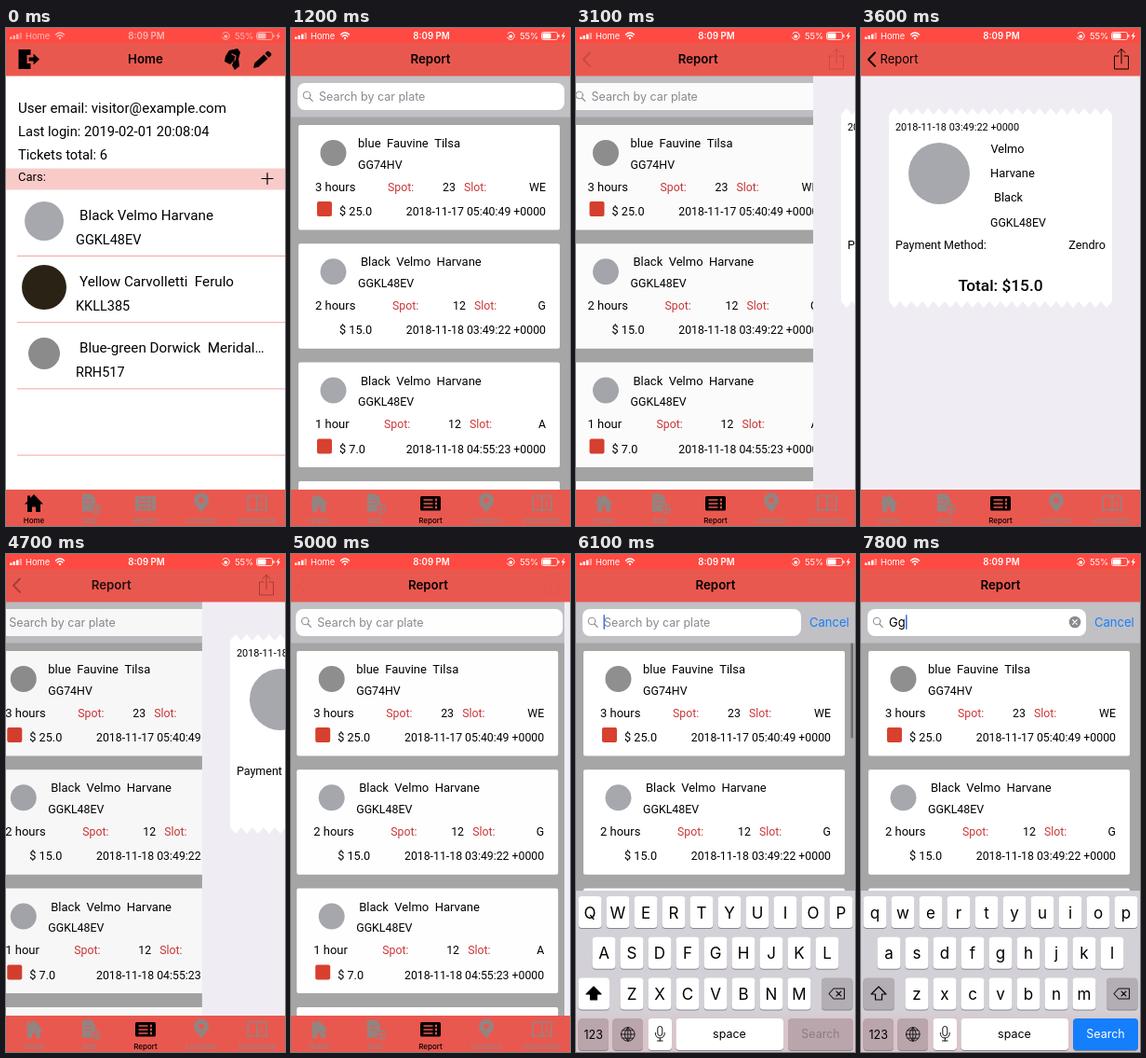
Recreate the animation shown at these times as an HTML page. Size 300x534 px, loop 8 s.

```html
<!DOCTYPE html>
<html lang="en">
<head>
<meta charset="utf-8">
<title>Parking report</title>
<style>
  html, body { margin: 0; width: 100%; height: 100%; overflow: hidden; background: #fff; }
  svg { display: block; width: 100vw; height: 100vh; }
  text { font-family: Inter, Roboto, sans-serif; }
  .din { font-family: Roboto, "Open Sans", sans-serif; }
  .line { fill: none; stroke-linecap: round; stroke-linejoin: round; }
</style>
</head>
<body>
<svg id="stage" viewBox="0 0 300 534"></svg>
<script>
const LOOP = 8000, STEP = 100;
const RED = '#e9584f', SPOT = '#cc3437', BLUE = '#157efb', MUTED = '#938481';

// Keyframe tables: [time, value]
const DETAIL = [[3000, 0], [3100, .15], [3200, .55], [3300, .82], [3400, .95], [3500, .99], [3600, 1],
  [4400, 1], [4500, .93], [4600, .62], [4700, .297], [4800, .13], [4900, .05], [5000, .02], [5200, 0]];
const KEYBOARD = [[5500, 0], [5600, .08], [5700, .32], [5800, .75], [5900, .93], [6000, .985], [6100, 1]];
const CANCEL = [[5600, 0], [5700, .04], [5800, .42], [5900, .82], [6000, .96], [6100, 1]];
const STATUS = [[0, .6], [200, 1]];
const REPORT_AT = 1200, FOCUS_AT = 5400;
const TYPED = [[6300, 'G'], [7000, 'Gg']];

// Drawing helpers
const text = (x, y, size, str, attrs = '') =>
  `<text x="${x}" y="${y}" font-size="${size}" ${attrs}>${str.replace(/ {2}/g, ' \u00a0')}</text>`;
const din = (x, y, size, str, attrs = '') => text(x, y, size, str, 'class="din" ' + attrs);
const rect = (x, y, w, h, fill, r = 0, attrs = '') =>
  `<rect x="${x}" y="${y}" width="${w}" height="${h}" rx="${r}" fill="${fill}" ${attrs}/>`;
const dot = (x, y, r, fill) => `<circle cx="${x}" cy="${y}" r="${r}" fill="${fill}"/>`;
const line = (d, color = '#000', w = 1, attrs = '') =>
  `<path class="line" d="${d}" stroke="${color}" stroke-width="${w}" ${attrs}/>`;
const shape = (d, fill = '#000') => `<path d="${d}" fill="${fill}"/>`;
const group = (id, body, attrs = '') => `<g id="${id}" ${attrs}>${body}</g>`;
const MID = 'text-anchor="middle"', END = 'text-anchor="end"';

function homePage() {
  const cars = [
    ['Black Velmo Harvane', 'GGKL48EV', '#a7a8ae', 21],
    ['Yellow Carvolletti  Ferulo', 'KKLL385', '#2a2315', 24],
    ['Blue-green Dorwick  Meridal…', 'RRH517', '#8b8b8b', 17],
  ];
  const rows = cars.map(([name, plate, color, r], i) => {
    const y = 71 * i;
    return dot(41, 207 + y, r, color) + din(79, 206 + y, 15.2, name) + din(75, 231.5 + y, 14.5, plate);
  });
  const rules = [0, 1, 2, 3].map(i => rect(12, 244 + 71.2 * i, 288, 1, '#f3a5a2'));
  return rect(0, 0, 300, 534, '#fff')
    + din(13, 91, 15.1, 'User email: visitor@example.com')
    + din(13, 115.5, 14.7, 'Last login: 2019-02-01 20:08:04')
    + din(13, 140.5, 14.7, 'Tickets total: 6')
    + rect(0, 150.5, 300, 23, '#f8cbc9') + din(13, 164, 13, 'Cars:')
    + line('M275 161.5h12M281 155.5v12', '#000', 1.2)
    + rows.join('') + rules.join('');
}

function card(i, c) {
  const y = 104 + 127.3 * i;
  const label = (x, s) => din(x, y + 70.5, 12.3, s, `fill="${SPOT}"`);
  return rect(8, y, 281, 112.5, '#fff', 2)
    + dot(45.5, y + 30, 14, c.color)
    + din(c.nameX, y + 24, 13, c.name) + din(72, y + 46.5, 12.4, c.plate)
    + din(26, y + 70.5, 13, c.time)
    + label(c.x[0], 'Spot:') + din(c.x[1], y + 70.5, 12.3, c.spot)
    + label(c.x[2], 'Slot:') + din(274, y + 70.5, 12.3, c.slot, END)
    + (c.paid ? rect(28, y + 82, 16, 16, '#d8402f', 2) : '')
    + din(52, y + 97, 12.7, c.price) + din(274, y + 97, 12.3, c.date, END);
}

function listPage() {
  const velmo = { color: '#a7a8ae', nameX: 75, name: 'Black  Velmo  Harvane', plate: 'GGKL48EV', spot: '12' };
  const cards = [
    { color: '#8f8f8f', nameX: 72, name: 'blue  Fauvine  Tilsa', plate: 'GG74HV', time: '3 hours', x: [104, 163, 186],
      spot: '23', slot: 'WE', paid: true, price: '$ 25.0', date: '2018-11-17 05:40:49 +0000' },
    { ...velmo, time: '2 hours', x: [109, 174, 197], slot: 'G', price: '$ 15.0', date: '2018-11-18 03:49:22 +0000' },
    { ...velmo, time: '1 hour', x: [100, 169, 192], slot: 'A', paid: true, price: '$ 7.0',
      date: '2018-11-18 04:55:23 +0000' },
  ];
  return rect(0, 0, 300, 534, '#a6a6a7')
    + rect(0, 51, 300, 44.5, '#c1c0c5')
    + rect(7, 59, 287, 29, '#fff', 8, 'id="field"')
    + `<circle cx="17" cy="72" r="3.8" class="line" stroke="#8a8a8f"/>` + line('M19.9 75l3.3 3.4', '#8a8a8f', 1.2)
    + text(30, 77.5, 12.5, 'Search by car plate', 'id="hint" fill="#8a8a90"')
    + text(30, 77.5, 13, '', 'id="query"')
    + rect(29.5, 65, 1.6, 16, '#3b78e7', .8, 'id="caret"')
    + group('clear', dot(230, 73, 6.3, '#8a8a8f') + line('M227.7 70.7l4.6 4.6m0-4.6l-4.6 4.6', '#fff', 1.2))
    + text(251, 77.5, 13, 'Cancel', `id="cancel" fill="${BLUE}"`)
    + cards.map((c, i) => card(i, c)).join('') + rect(8, 486, 281, 48, '#fff', 2)
    + rect(295.5, 95.5, 2.5, 102, '#6d6d6e', 1.2, 'id="scroll"')
    + rect(0, 0, 300, 534, '#000', 0, 'id="dim"');
}

function detailPage() {
  const teeth = 20, w = 240 / teeth;
  const top = `l${w / 2} -7l${w / 2} 7`.repeat(teeth), bottom = `l${-w / 2} 7l${-w / 2} -7`.repeat(teeth);
  return rect(0, 0, 300, 534, '#efedf3')
    + shape(`M30 93${top}V293${bottom}Z`, '#fff')
    + din(37, 109.5, 10.9, '2018-11-18 03:49:22 +0000')
    + dot(84, 156, 33, '#a7a8ae')
    + din(139.5, 133.5, 12.7, 'Velmo') + din(139, 160, 12.9, 'Harvane')
    + din(143, 186, 12.7, 'Black') + din(139, 212.5, 12.3, 'GGKL48EV')
    + din(37, 237, 12.5, 'Payment Method:') + din(263, 237, 12.7, 'Zendro', END)
    + din(150, 282, 17.3, 'Total: $15.0', MID + ' font-weight="500"');
}

function navBar() {
  const homeIcons =
    `<g transform="translate(-1.5 0)">${shape('M15 23h13v6h-4v9h4v6H15Z')
      + shape('M26 31.5h5v-4l6.5 6-6.5 6v-4h-5Z')}</g>`
    + shape('M240 24l9-2 3 4-2 7 1 8-5 4-3-5 2-5-4 4-6-3 1-6Z') + line('M243 28l4 2-1 5', RED, 1.2)
    + shape('M266 43l1.3-5.5 10-9 4.3 4.3-10 9ZM278.5 27.3l2.2-2.2q1.2-1 2.500.3l1.700 1.700q1.200 1.200 0 2.500l-2.200 2.200Z');
  return rect(0, 0, 300, 51.5, RED) + rect(0, 0, 300, 16, '#fe4a42')
    + group('homeIcons', homeIcons)
    + text(150, 38, 13.3, 'Home', `id="title" ${MID} font-weight="600"`)
    + text(41, 38, 13, 'Report', `id="back" ${MID}`)
    + group('detailIcons', line('M15 26.5L8 33.7l7 7.2', '#000', 2)
      + line('M277 30h-4.5v14h15V30H283M280 38V23M276 26.5l4-4 4 4'));
}

function statusBar() {
  const bars = [2.5, 4, 5.5, 7].map((h, i) => rect(4 + 3.5 * i, 12 - h, 2.5, h, '#fff', .5, i > 2 ? 'opacity=".45"' : ''));
  return group('status', bars.join('') + text(21, 12, 9.4, 'Home')
    + line('M53.5 7q4.5-4 9 0M55.2 9q2.8-2.4 5.6 0', '#fff', 1.4) + dot(58, 11, 1.2, '#fff')
    + text(151, 12, 9.7, '8:09 PM', MID + ' font-weight="600"')
    + line('M233 6a4 4 0 1 1-.5 4', '#fff') + rect(234.5, 7.5, 3.5, 3, '#fff', .5)
    + text(246, 12, 9.4, '55%')
    + rect(269.5, 4.5, 17, 8, 'none', 2, 'stroke="#fff" stroke-width=".8"') + rect(270.5, 5.5, 9, 6, '#fff', 1)
    + rect(287.3, 7, 1.2, 3, '#fff', .5) + shape('M294 4l-3.5 5h2l-1 4 3.5-5h-2Z', '#fff'), 'fill="#fff"');
}

function tabBar() {
  const me = 'currentColor';
  const icons = [
    ['Home', shape('M0-9.5L10 1H7V9.5H2V4H-2V9.5H-7V1H-10L-7-2V-8H-4V-5.5Z', me)],
    ['Add', shape('M-8-10H1L6-5V9H-8Z', me) + line('M-5-3H2M-5 1H1', RED) + dot(7, 6, 5.5, RED)
      + `<circle cx="7" cy="6" r="4.5" class="line" stroke="${me}" stroke-width="1.3"/>`
      + line('M4.5 6h5M7 3.5v5', me, 1.3)],
    ['Report', rect(-11, -7.5, 22, 15.5, me, 1.5) + line('M-7-3.5H2M-7 .5H2M-7 4.5H2', RED, 1.5)
      + line('M6-4v1M6 0v1M6 4v1', RED, 2)],
    ['Location', shape('M0 10C-3 5-8 2-8-3a8 8 0 0 1 16 0C8 2 3 5 0 10Z', me) + dot(0, -3, 2.8, RED)],
    ['Instruction', line('M0-7Q-5-9-10-7V8Q-5 6 0 8Q5 6 10 8V-7Q5-9 0-7V8M5-4v.2M5-1v4', me, 1.5)],
  ];
  return rect(0, 495, 300, 39, RED)
    + icons.map(([name, icon], i) => group('tab' + i,
      `<g transform="translate(${30 + 60 * i} 509.5)">${icon}</g>`
      + text(30 + 60 * i, 531, 8, name, MID + ' fill="currentColor" font-weight="500"'))).join('');
}

function keyboard() {
  const key = (x, y, w, fill = '#fff', attrs = '') =>
    rect(x, y + 1, w, 34, '#88868a', 4) + rect(x, y, w, 34, fill, 4, attrs);
  const letters = ['QWERTYUIOP', 'ASDFGHJKL', 'ZXCVBNM'].map((row, r) =>
    [...row].map((ch, i) => {
      const x = [15, 30, 60][r] + 30 * i, y = 6 + 43.7 * r;
      return key(x - 12.5, y, 25) + text(x, y + 23.5, 17, ch, MID + ' data-letter');
    }).join('')).join('');
  const soft = '#b9a5ab', y = 137;
  return rect(0, 0, 300, 180, 'url(#board)') + letters
    + key(2.5, 93.4, 33.5, '#fff', 'id="shiftKey"')
    + line('M19 103l-8 8h4.5v6h7v-6h4.5Z', '#000', 1.2, 'id="shiftIcon"')
    + key(264, 93.4, 33.5, '#b3adb4')
    + line('M272 110.5l5-5.5h11.5v11H277ZM280 108l5 5m0-5l-5 5', '#111', 1.1)
    + key(2.5, y, 32.5, soft) + text(18.7, y + 21.5, 12.5, '123', MID)
    + key(39.5, y, 32.5, soft)
    + line('M48.5 154a7.3 7.3 0 1 0 14.6 0a7.3 7.3 0 1 0-14.6 0ZM55.8 146.7v14.6M48.5 154h14.6'
      + 'M55.8 146.7q-7 7.3 0 14.6q7-7.3 0-14.6M50 149.8h11.6M50 158.2h11.6', '#111', .9)
    + key(77.5, y, 25.5) + rect(87.8, 145.5, 5, 10, 'none', 2.5, 'stroke="#111"')
    + line('M85.3 152.5q0 5.5 5 5.5t5-5.5M90.3 158v3M87.5 161h5.6', '#111')
    + key(107.5, y, 115.5) + text(165, y + 21, 12.5, 'space', MID)
    + key(228, y, 70, soft, 'id="searchKey"') + text(263, y + 21, 12.5, 'Search', 'id="searchText" ' + MID);
}

const stage = document.getElementById('stage');
stage.innerHTML =
  `<defs><linearGradient id="board" x2="0" y2="1"><stop offset="0" stop-color="#d2d2d8"/>
   <stop offset=".72" stop-color="#d3d0d6"/><stop offset=".8" stop-color="#d9c5ca"/></linearGradient></defs>`
  + group('home', homePage()) + group('list', listPage()) + group('detail', detailPage())
  + group('nav', navBar()) + statusBar() + group('tabs', tabBar()) + group('keys', keyboard());

const el = {};
stage.querySelectorAll('[id]').forEach(node => { el[node.id] = node; });
const letters = [...stage.querySelectorAll('[data-letter]')];

function track(table, t) {
  if (t <= table[0][0]) return table[0][1];
  for (let i = 1; i < table.length; i++) {
    const [t0, a] = table[i - 1], [t1, b] = table[i];
    if (t <= t1) return a + (b - a) * (t - t0) / (t1 - t0);
  }
  return table[table.length - 1][1];
}
const show = (node, on) => node.setAttribute('visibility', on ? 'visible' : 'hidden');
const move = (node, x, y = 0) => node.setAttribute('transform', `translate(${x} ${y})`);
const clamp = v => Math.max(0, Math.min(1, v));

function draw(t) {
  const onReport = t >= REPORT_AT, focused = t >= FOCUS_AT;
  const q = track(DETAIL, t), p = 1 - q;
  const rise = track(KEYBOARD, t), shrink = track(CANCEL, t);
  const query = TYPED.reduce((s, [at, str]) => t >= at ? str : s, '');

  el.home.style.display = onReport ? 'none' : '';
  el.list.style.display = onReport ? '' : 'none';
  el.detail.style.display = q > 0 ? '' : 'none';
  move(el.list, -90 * q);
  move(el.detail, 300 * p);
  el.dim.setAttribute('opacity', .1 * q);
  el.status.setAttribute('opacity', track(STATUS, t));

  show(el.homeIcons, !onReport);
  el.title.textContent = onReport ? 'Report' : 'Home';
  const titleX = 41 + 109 * p ** 1.17;
  el.title.setAttribute('x', titleX);
  el.back.setAttribute('x', titleX);
  el.title.setAttribute('opacity', clamp(p * 1.2));
  el.back.setAttribute('opacity', clamp(1 - p * 1.5));
  el.detailIcons.setAttribute('opacity', q);
  for (let i = 0; i < 5; i++) el['tab' + i].style.color = i === (onReport ? 2 : 0) ? '#000' : MUTED;

  el.field.setAttribute('width', 287 - 52 * shrink);
  el.cancel.setAttribute('opacity', clamp(shrink * 1.2 - .2));
  move(el.cancel, 51 * (1 - shrink));
  show(el.caret, focused);
  move(el.caret, [0, 10, 18.5][query.length]);
  show(el.scroll, focused && t < TYPED[0][0]);
  show(el.hint, !query);
  show(el.clear, !!query);
  el.query.textContent = query;

  el.keys.style.display = rise > 0 ? '' : 'none';
  move(el.keys, 0, 534 - 173 * rise);
  letters.forEach(node => {
    const ch = node.textContent;
    node.textContent = query ? ch.toLowerCase() : ch.toUpperCase();
  });
  el.shiftKey.setAttribute('fill', query ? '#b3adb4' : '#fff');
  el.shiftIcon.style.fill = query ? 'none' : '#000';
  el.searchKey.setAttribute('fill', query ? BLUE : '#b9a5ab');
  el.searchText.setAttribute('fill', query ? '#fff' : '#897d82');
}

const start = performance.now();
function frame() {
  const t = (performance.now() - start) % LOOP;
  draw(Math.floor(t / STEP) * STEP);
  requestAnimationFrame(frame);
}
frame();
</script>
</body>
</html>
```
